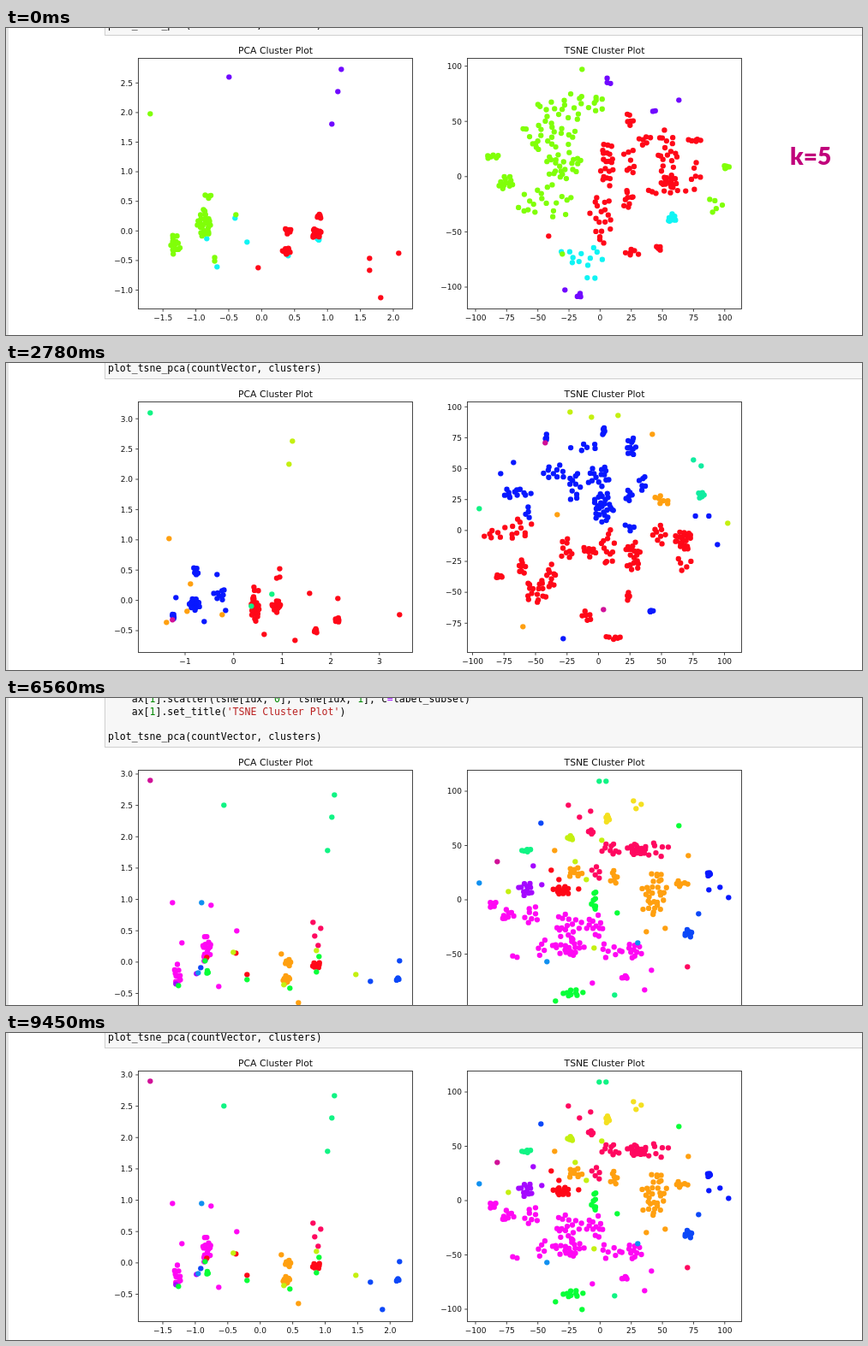
Write an HTML page with a canvas that moves like this. It is 999 px wide and 359 px high and loops after 9950 ms.

```html
<!DOCTYPE html>
<html>
<head>
<meta charset="utf-8">
<title>Cluster plots</title>
<style>
html, body { margin: 0; width: 100%; height: 100%; overflow: hidden; background: #fff; }
canvas { display: block; }
</style>
</head>
<body>
<canvas id="stage" width="999" height="359"></canvas>
<script>
const ctx = document.getElementById('stage').getContext('2d');
const LOOP = 9950, LEFT = 154.5, RIGHT = 538.5, AXW = 320, AXH = 293;
const LIME = '#80ff08', CYAN = '#10f4f4', RED = '#ff0818', VIOLET = '#7008ff', BLUE = '#0818ff',
  ORANGE = '#ffa010', CITRON = '#c4f010', TEAL = '#10eca0', MINT = '#10f484', PLUM = '#d01098',
  GOLD = '#f8c818', PURPLE = '#a408ff', PINK = '#ff08f4', INDIGO = '#3c08ff', RUST = '#ff7010',
  GREEN = '#08ff38', ROSE = '#ff0860', AZURE = '#1090f0', COBALT = '#0c48f8', YELLOW = '#f4e020';

// [x, y] is one dot; [x, y, rx, ry, n] is a seeded cloud of n dots in an ellipse.
let dots, seed;
const rnd = () => (seed = seed * 16807 % 2147483647) / 2147483647;
function put(color, ...groups) {
  for (const [x, y, rx = 0, ry = 0, n = 1] of groups) {
    const turn = rnd() * 6.28;
    for (let i = 0; i < n; i++) {
      const r = Math.sqrt((i + rnd()) / n), a = turn + i * 2.4 + rnd();
      dots.push([x + rx * r * Math.cos(a), y + ry * r * Math.sin(a), color]);
    }
  }
}

// ticks: [first position, spacing, first value, value step]
const WIDE = [548, 36.35, -100, 25];
function scene(top, lx, ly, rx, ry, fill) {
  dots = [];
  seed = 77;
  fill();
  return { top, lx, ly, rx, ry, dots };
}

const five = scene(35, [183.2, 38.4, -1.5, 0.5], [306.5, -34.6, -1, 0.5], WIDE, [303, -64.6, -100, 50], () => {
  put(CYAN, [267, 222], [281, 250], [234, 246], [246, 279], [329, 266], [364, 247, 3, 1, 3],
    [777, 222, 5, 6, 9], [675, 266, 30, 12, 11], [686, 292, 8, 5, 2]);
  put(LIME, [168, 100], [268, 218], [235, 197, 5, 3, 4], [231, 228, 8, 17, 26], [197, 253, 6, 13, 13], [244, 271, 4, 3, 2],
    [672, 48], [660, 91, 42, 17, 25], [632, 125, 34, 18, 25], [650, 160, 24, 16, 24], [568, 150, 8, 3, 6],
    [583, 181, 9, 9, 12], [630, 203, 34, 22, 20], [840, 162, 4, 2, 5], [826, 206, 11, 10, 5], [649, 264]);
  put(RED, [294, 280], [424, 269], [424, 283], [458, 263], [437, 315], [329, 237, 4, 4, 7], [327, 261, 5, 4, 11],
    [365, 220, 3, 3, 5], [362, 240, 6, 6, 14],
    [727, 107, 5, 9, 6], [745, 130, 8, 7, 6], [803, 131, 8, 2, 6], [701, 158, 8, 29, 21], [728, 155, 8, 18, 8],
    [771, 145, 13, 27, 18], [774, 179, 10, 8, 18], [805, 172, 8, 18, 6], [726, 201, 7, 12, 9], [768, 191, 26, 3, 7],
    [694, 222, 14, 30, 19], [633, 243], [731, 262, 9, 5, 6], [762, 257, 4, 3, 4]);
  put(VIOLET, [260, 57], [391, 48], [387, 74], [380, 112], [702, 62, 4, 5, 3], [785, 84], [756, 97, 2, 1, 2],
    [652, 306], [669, 313, 3, 3, 4]);
});

const ten = scene(45, [209, 56.7, -1, 1], [313, -35.4, -0.5, 0.5], [544.5, 36.75, -100, 25], [304.3, -36.15, -75, 25], () => {
  put(BLUE, [221, 243, 3, 6, 6], [198, 274], [246, 247], [249, 271, 8, 8, 8], [256, 289], [231, 302], [195, 296, 2, 3, 6],
    [220, 282, 7, 7, 16],
    [630, 86, 2, 4, 4], [592, 116], [577, 129], [594, 152, 19, 6, 12], [608, 174, 4, 8, 4], [640, 128, 14, 10, 10],
    [663, 145, 8, 19, 11], [674, 99, 18, 7, 6], [697, 80, 2, 5, 5], [729, 97, 7, 11, 11], [691, 133, 14, 14, 15],
    [697, 168, 12, 19, 27], [727, 155, 4, 9, 6], [743, 140, 6, 9, 6], [727, 192, 6, 8, 4], [810, 179, 11, 1, 2],
    [830, 212], [753, 290, 4, 1, 4], [650, 322]);
  put(RED, [318, 250, 3, 12, 3], [291, 268, 5, 8, 4], [290, 288, 5, 15, 21], [315, 284, 5, 8, 15], [354, 269], [387, 275],
    [386, 300, 3, 3, 7], [361, 313, 2, 3, 5], [337, 324], [301, 317], [459, 294],
    [568, 200, 12, 6, 6], [598, 194, 20, 12, 11], [575, 249, 5, 2, 6], [602, 238, 5, 9, 8], [620, 266, 15, 15, 18],
    [636, 248, 6, 14, 9], [654, 217, 7, 17, 9], [680, 220, 8, 8, 8], [702, 215, 8, 26, 13], [731, 226, 9, 20, 19],
    [762, 200, 9, 12, 9], [790, 207, 10, 13, 21], [792, 235, 11, 10, 5], [726, 273, 2, 5, 5], [678, 295, 6, 8, 6],
    [709, 321, 11, 2, 6]);
  put(ORANGE, [190, 205], [187, 303], [215, 258], [211, 290], [252, 294], [754, 83], [766, 160, 11, 6, 7], [643, 177], [603, 308]);
  put(MINT, [168, 58], [286, 284], [310, 270], [552, 170]);
  put(CITRON, [334, 91], [330, 118], [658, 57], [683, 63], [714, 61], [842, 187]);
  put(TEAL, [802, 113], [811, 120], [811, 153, 4, 5, 6]);
  put(PLUM, [194, 300], [629, 93], [697, 288]);
});

const fifteen = scene(65, [161, 39.7, -1.5, 0.5], [329.3, -39.8, -0.5, 0.5], WIDE, [344.5, -36.1, -100, 25], () => {
  put(PURPLE, [220, 220], [212, 255], [208, 297, 8, 7, 21], [247, 278, 4, 5, 6], [266, 282], [264, 304],
    [786, 122, 9, 8, 10], [813, 129], [743, 135], [609, 171, 9, 18, 9], [843, 198], [656, 229, 26, 18, 9],
    [608, 244, 8, 6, 6], [675, 265, 22, 18, 30], [638, 271, 15, 6, 6], [654, 297, 8, 10, 8], [669, 319], [613, 297],
    [703, 267, 11, 14, 10], [685, 239, 14, 10, 9], [733, 306], [760, 318]);
  put(PINK, [177, 312, 5, 5, 9], [168, 321], [182, 293], [579, 151], [588, 229], [686, 215, 4, 6, 5],
    [725, 265], [782, 147]);
  put(INDIGO, [317, 271], [307, 296], [311, 308, 6, 15, 18], [327, 342], [355, 308], [361, 320], [405, 317],
    [410, 329, 3, 3, 4], [459, 344], [275, 334],
    [770, 78], [632, 155, 4, 6, 7], [711, 144], [728, 168, 20, 3, 6], [710, 189, 12, 10, 9], [744, 202, 13, 16, 18],
    [767, 178, 12, 10, 6], [774, 205, 9, 12, 9], [806, 193, 3, 10, 6], [798, 232, 5, 10, 9], [764, 236, 12, 8, 6], [731, 342]);
  put(RED, [353, 248], [347, 256], [349, 272, 2, 7, 6], [346, 296, 5, 5, 13], [449, 296], [446, 312, 4, 4, 6],
    [663, 80, 2, 5, 4], [703, 80], [746, 103, 5, 10, 5], [691, 104, 13, 8, 21], [663, 106, 8, 6, 5],
    [616, 119, 3, 3, 3], [638, 129, 18, 4, 7], [685, 123, 20, 8, 12], [670, 148, 11, 6, 8], [728, 148, 7, 6, 9],
    [738, 243, 5, 4, 7], [719, 221], [753, 275, 5, 6, 9], [796, 258, 6, 6, 7]);
  put(RUST, [172, 214], [242, 222], [208, 277], [175, 294], [656, 194, 11, 9, 11], [713, 293]);
  put(MINT, [205, 208], [221, 222], [252, 250], [215, 268], [588, 195, 4, 8, 6], [571, 205], [606, 207], [638, 170]);
  put(LIME, [809, 166, 4, 4, 7], [823, 166], [826, 178]);
  put(GOLD, [372, 76], [367, 106], [552, 226], [592, 275], [694, 344]);
});

const twenty = scene(45, [183, 37.9, -1.5, 0.5], [306.5, -36.65, -0.5, 0.5], WIDE, [324, -63.5, -100, 50], () => {
  put(PINK, [194, 200], [239, 203], [205, 247], [200, 284, 4, 14, 10], [234, 255, 5, 18, 18], [248, 298], [269, 233],
    [568, 202, 5, 4, 6], [585, 214, 8, 7, 8], [592, 263, 14, 1, 2], [613, 216, 9, 13, 8], [625, 251, 6, 12, 5],
    [657, 227, 16, 17, 17], [657, 252, 20, 10, 20], [687, 227, 11, 14, 12], [705, 256, 14, 11, 8],
    [733, 256, 9, 10, 10], [722, 287, 4, 2, 5], [753, 279], [684, 294], [745, 302]);
  put(PURPLE, [198, 295], [222, 283], [606, 185, 9, 9, 11], [615, 157], [625, 179]);
  put(COBALT, [227, 276], [459, 268], [425, 292], [457, 290, 2, 2, 4], [439, 324],
    [624, 107], [796, 236, 5, 5, 9], [808, 213]);
  put(AZURE, [228, 200], [224, 282], [552, 177], [737, 247], [631, 269]);
  put(RED, [234, 264], [268, 259], [281, 284], [362, 273, 5, 4, 9], [636, 162], [649, 186, 12, 5, 13], [645, 173], [668, 184]);
  put(ROSE, [358, 223], [367, 230], [360, 239], [364, 250], [656, 86], [682, 93], [669, 100], [682, 117, 3, 4, 5],
    [706, 137, 12, 8, 9], [736, 138, 12, 7, 18], [762, 140, 15, 11, 7], [690, 164, 7, 9, 5], [795, 275]);
  put(ORANGE, [321, 260], [329, 270, 4, 4, 8], [327, 290, 4, 5, 11], [341, 317],
    [640, 139], [664, 164, 9, 7, 9], [709, 170, 6, 8, 7], [757, 183, 15, 20, 22], [754, 206, 13, 8, 9],
    [787, 178, 9, 4, 6], [796, 145], [747, 234], [769, 230]);
  put(GREEN, [232, 268], [235, 281, 1, 4, 3], [201, 297], [281, 290], [365, 263], [362, 281], [331, 300],
    [785, 110], [686, 197, 4, 12, 8], [713, 212], [659, 306, 10, 5, 8], [673, 305], [641, 315], [672, 324]);
  put(CITRON, [265, 258], [408, 284], [362, 256], [324, 296], [659, 124, 4, 3, 5], [695, 127], [664, 152], [677, 173],
    [586, 187], [686, 253]);
  put(YELLOW, [732, 81], [741, 85], [735, 90], [701, 102, 3, 5, 6]);
  put(MINT, [254, 86], [383, 74], [380, 100], [375, 139], [692, 58], [700, 58], [607, 139, 6, 2, 6], [710, 308]);
  put(BLUE, [820, 166, 2, 3, 6], [820, 185], [833, 182], [843, 194]);
  put(PLUM, [168, 57], [573, 152]);
});

// [start, scene, vertical shift, label]
const cues = [
  [0, five, 0, 'k=5'], [230, five, 0], [2460, ten, 0, 'k=10'], [2780, ten, 0],
  [3860, fifteen, 0, 'k=15'], [4170, fifteen, 0], [6240, twenty, 39, 'k=20'], [6560, twenty, 39],
  [8460, twenty, 38], [8530, twenty, 19], [8600, twenty, 0], [8650, twenty, -1]
];

const INK = '#000', STR = '#ba2121', NUM = '#008800', OP = '#aa22ff';
const code = [
  [['    ax[', INK], ['1', NUM], ['].scatter(tsne[idx, ', INK], ['0', NUM], ['], tsne[idx, ', INK],
    ['1', NUM], ['], c', INK], ['=', OP], ['label_subset)', INK]],
  [['    ax[', INK], ['1', NUM], ['].set_title(', INK], ["'TSNE Cluster Plot'", STR], [')', INK]],
  [],
  [['plot_tsne_pca(countVector, clusters)', INK]]
];

function text(str, x, y, font, align = 'left', color = '#111') {
  ctx.font = font;
  ctx.textAlign = align;
  ctx.fillStyle = color;
  ctx.fillText(str, x, y);
}

function drawCell(top) {
  const bottom = Math.round(top - 27);
  ctx.fillStyle = '#f7f7f7';
  ctx.fillRect(115, 0, 884, bottom);
  ctx.fillStyle = '#cfcfcf';
  ctx.fillRect(115, 0, 1, bottom);
  ctx.fillRect(115, bottom, 884, 1);
  code.forEach((line, i) => {
    let x = 119;
    for (const [str, color] of line) {
      text(str, x, top - 35 - (3 - i) * 14.6, '11.53px "DejaVu Sans Mono", monospace', 'left', color);
      x += ctx.measureText(str).width;
    }
  });
}

function drawAxes(left, top, title, xs, ys, dy) {
  const font = '9px "DejaVu Sans", sans-serif', bottom = top + AXH;
  const label = (t, i) => (t[2] + t[3] * i).toFixed(t[3] < 1 ? 1 : 0).replace('-', '\u2212');
  ctx.strokeStyle = '#333';
  ctx.lineWidth = 0.9;
  ctx.strokeRect(left, top, AXW, AXH);
  ctx.beginPath();
  for (let i = 0, x; (x = xs[0] + xs[1] * i) < left + AXW; i++) {
    ctx.moveTo(x, bottom);
    ctx.lineTo(x, bottom + 3.2);
    text(label(xs, i), x, bottom + 13, font, 'center');
  }
  for (let i = 0, y; (y = ys[0] + ys[1] * i + dy) > top; i++) {
    ctx.moveTo(left, y);
    ctx.lineTo(left - 3.2, y);
    text(label(ys, i), left - 6.5, y + 3.3, font, 'right');
  }
  ctx.stroke();
  text(title, left + AXW / 2, top - 5.5, '10.8px "DejaVu Sans", sans-serif', 'center');
}

function draw(time) {
  const [, s, dy, label] = cues.filter(c => c[0] <= time).pop();
  const top = s.top + dy;
  ctx.fillStyle = '#fff';
  ctx.fillRect(0, 0, 999, 359);
  ctx.fillStyle = '#e4e4e4';
  ctx.fillRect(0, 0, 3, 359);
  drawCell(top);
  for (const [x, y, color] of s.dots) {
    ctx.fillStyle = color;
    ctx.beginPath();
    ctx.arc(x + 0.3, y + dy + 0.3, 3.15, 0, 7);
    ctx.fill();
  }
  drawAxes(LEFT, top + 0.5, 'PCA Cluster Plot', s.lx, s.ly, dy);
  drawAxes(RIGHT, top + 0.5, 'TSNE Cluster Plot', s.rx, s.ry, dy);
  if (label) text(label, 915, 160, '900 28px Lato, sans-serif', 'left', '#c0007b');
}

const start = performance.now();
function tick() {
  draw((performance.now() - start) % LOOP);
  requestAnimationFrame(tick);
}
tick();
</script>
</body>
</html>
```
